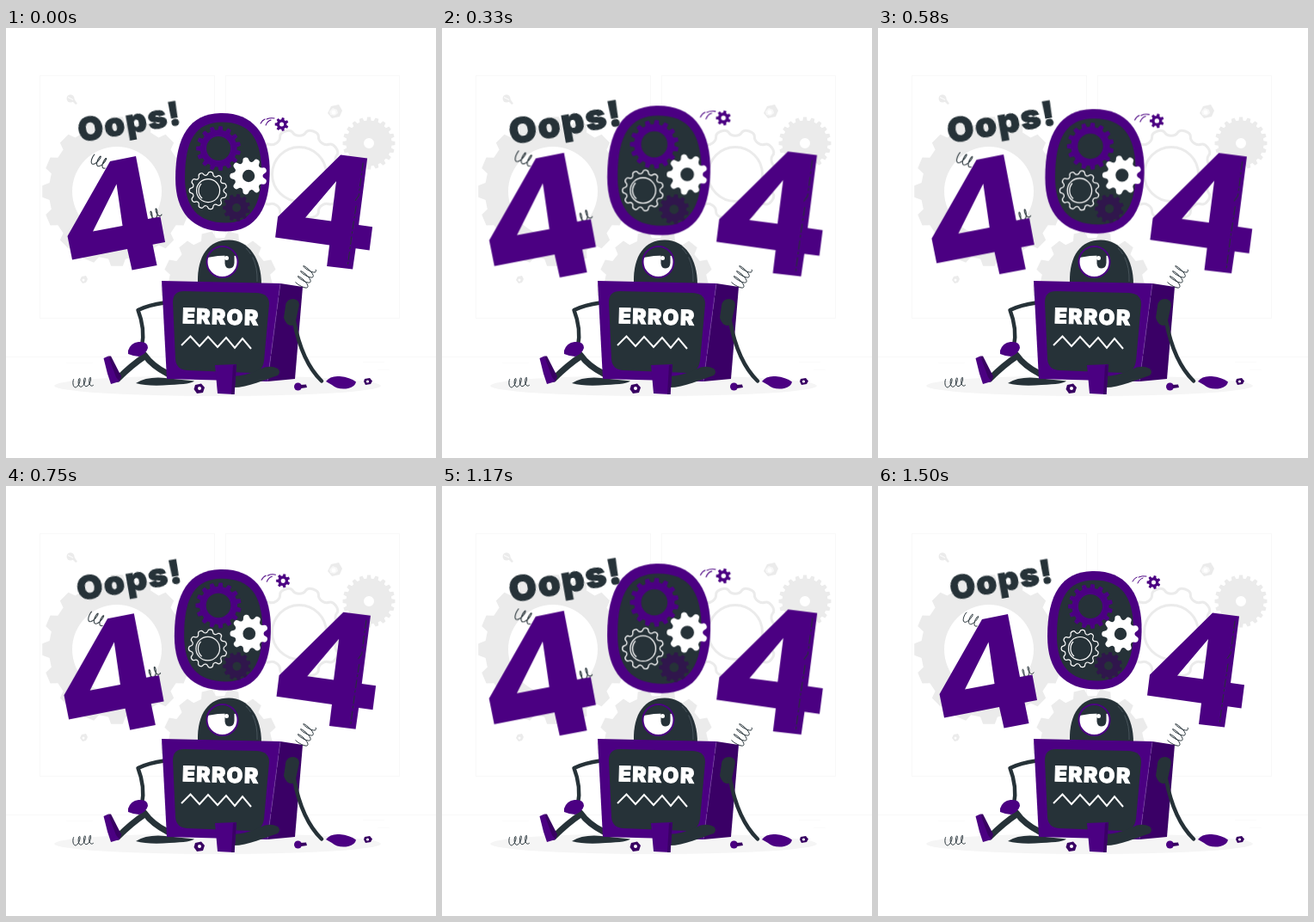
Write an HTML page that moves like this. It is 500 px wide and 500 px high and loops after 1540 ms.

```html
<!DOCTYPE html>
<html lang="en">
<head>
<meta charset="utf-8">
<title>404</title>
<style>
  html, body { margin: 0; width: 100%; height: 100%; overflow: hidden; background: #fff; }
  svg { display: block; width: 100vw; height: 100vh; }
  .p { fill: #4b0082; }
  .d { fill: #263238; }
  .g { fill: #ebebeb; }
  .w { fill: #fff; }
  .line { fill: none; stroke: #263238; stroke-linecap: round; stroke-linejoin: round; }
  .thin { stroke-width: 1; }
  .chalk { fill: none; stroke: #fff; stroke-width: 1.2; }
  .faint { fill: none; stroke: #f8f8f8; }
  .ghost { fill: none; stroke: #ebebeb; stroke-width: 3; }
  text { font-family: Inter, "Open Sans", sans-serif; font-weight: 900; text-anchor: middle; stroke-width: .9; }
  .beat { animation: beat 1540ms linear infinite; }
  #digits { transform-origin: 248.5px 190px; }
  #oops { transform-origin: 145px 108.5px; }
  @keyframes beat {
    0%, 57.6%, 96.8%, 100% { transform: scale(1); }
    19.1%, 77% { transform: scale(1.1); }
  }
</style>
</head>
<body>
<svg viewBox="0 0 500 500">
  <!-- backdrop -->
  <g class="faint">
    <rect x="39.5" y="55.5" width="203" height="282"/>
    <rect x="255.5" y="55.5" width="202" height="282"/>
    <path d="M0 382.5H500"/>
    <path d="M415 388.5H440M432 397.5H446M70 389.5H101M131 393.5H143" stroke="#fbfbfb"/>
  </g>
  <path class="g" fill-rule="evenodd" data-gear="129 190 16 87 79 52"/>
  <path class="g" data-gear="249 305 14 69 61"/>
  <path class="ghost" data-cog="341 170 10 53 45"/>
  <circle class="ghost" cx="341" cy="170" r="31.500"/>
  <path class="g" fill-rule="evenodd" data-gear="422 134 20 30.5 26.5 6"/>
  <g class="g">
    <circle cx="75" cy="82" r="4.500"/>
    <path d="M76 84L79 82L83 88L81 89Z"/>
    <path d="M378 91L387 89L391 96L388 103L379 105L374 99Z"/>
    <path d="M88 289L93 288L95 292L93 296L89 297L86 293Z"/>
  </g>
  <path d="M376 97L380 93L385 95L386 99L382 102L377 101Z" fill="#f7f7f7"/>
  <circle class="w" cx="381" cy="98" r="2.500"/>
  <circle class="w" cx="90" cy="293" r="1.500"/>
  <path d="M72 80.500L78 83.500" stroke="#fff"/>
  <ellipse cx="246" cy="416" rx="190" ry="12" fill="#f5f5f5"/>

  <!-- 404 -->
  <g id="digits" class="beat">
    <path class="line thin" data-coil="101 152 117 158 2.5 6"/>
    <path class="line thin" data-coil="164 221 179 213 2.5 5"/>
    <path class="p" fill-rule="evenodd" d="M121 155L151 149L165 222L179.500 219.500L185 249L170.500 251.800L175.500 276L146.500 281.500L141 257L77 269.500L71.500 242ZM101 236.500L135.500 230L128.500 181.500Z"/>
    <path class="p" fill-rule="evenodd" d="M389 147.500L420 151.500L410 229L426 231.300L422.500 258.500L406.500 256.300L403 280.500L373 277L376 252.500L313 243.500L316 219.500ZM348 220.500L378 224.500L384 178Z"/>
    <path class="line" stroke-dasharray="9 3 2 4" d="M415 157L410 195L405 202M407 207L402 240L397 278"/>
    <path class="p" d="M249 99C286 98 305 122 306.500 161C308 209 291 236.500 255 236.500C216 236.500 197 214 197 175C197 125 214 100 249 99Z"/>
    <path class="d" d="M251 109.500C283 109.500 296 128 297 164C298 208 283 226.500 256 226.500C222 226.500 208 208 208 174C208 130 221 109.500 251 109.500Z"/>
    <path class="p" fill-rule="evenodd" data-gear="247 140 15 26 21.5 14"/>
    <path fill="#30164c" fill-rule="evenodd" data-gear="268 209 11 16 13 5"/>
    <path class="w" fill-rule="evenodd" data-cog="282 172 9 22 16.5 7.2"/>
    <path class="chalk" data-cog="235 189 11 22 18"/>
    <circle class="chalk" cx="235" cy="189" r="13.500"/>
    <path class="chalk" d="M227 181A12 12 0 0 0 228 198" stroke-width=".8"/>
    <path class="p" fill-rule="evenodd" data-gear="320.5 112 7 8 5.8 2.5"/>
    <path class="line thin" style="stroke:#4b0082" d="M296 111Q298 107 301 106M302 113Q304 108 308 107M303 106Q307 104 312 105"/>
  </g>
  <g id="oops" class="beat">
    <text class="d" stroke="#263238" font-size="38" letter-spacing="1.4" transform="translate(146 122.500) rotate(-10)">Oops!</text>
  </g>

  <!-- head -->
  <path class="d" d="M223 297C222 264 236 246.500 259 246.500C283 246.500 297 269 297 298Z"/>
  <path d="M279 256Q293 270 292 295" fill="none" stroke="#56636a" stroke-width=".7" stroke-dasharray="9 4 30"/>
  <circle cx="251.500" cy="272" r="18" class="w"/>
  <path class="d" d="M234 267A18 18 0 0 1 268.500 265Q252 263.500 234 267Z"/>
  <path class="d" d="M254.500 264H265.500V273Q265 279.500 260 279.500Q255 279.500 254.500 274Z"/>
  <circle class="w" cx="256.500" cy="267.500" r="2.500"/>
  <circle cx="251.500" cy="272" r="18" fill="none" stroke="#4b0082" stroke-width="2"/>

  <!-- limbs behind the body -->
  <path class="line" stroke-width="4.500" d="M184 319.500Q166 322 153.500 328Q162 350 158 370"/>
  <path class="line" stroke-width="7" d="M161 380Q170 393 188 402"/>
  <path class="line" stroke-width="7" d="M130 408Q146 392 161 382"/>
  <path class="p" d="M142 375Q145 366 154 365Q165 364 165 372Q163 379 155 382Q149 382 142 379Z"/>
  <path class="p" d="M113.500 384L119 381.500L132 404L132 411L122 414L118 402Z"/>
  <path d="M119 381.500L122 381.500L134 405L132 411L128 406Z" fill="#380062"/>
  <path class="d" d="M151 413Q164 405 185 407L219 410.500Q216 414 190 415Q166 417 151 413Z"/>
  <path class="line thin" data-coil="343 299 354 278 3.5 8"/>

  <!-- body -->
  <path d="M319 297L345 301L336 408L304 411Z" fill="#3a0066"/>
  <path class="p" d="M181 294L319 297L304 411L187 408Z"/>
  <path d="M319 297L304 411" stroke="#7440a0" stroke-width=".7" stroke-dasharray="14 3"/>
  <path class="d" d="M207 306L292 308Q306 309 306 321L300 387Q298 401 285 401L210 398Q198 397 197 385L194 319Q194 306 207 306Z"/>
  <text class="w" stroke="#fff" font-size="24.500" letter-spacing="1.300" transform="translate(249.500 344.500) rotate(1.500)">ERROR</text>
  <path d="M204 369L214.500 358.500L225 370L235 359L246 371L256 360L266 372L275 361L285 373" fill="none" stroke="#fff" stroke-width="2"/>

  <!-- right arm and leg -->
  <path class="d" d="M325 323Q326 315 334 315Q341 316 341 322L336 345Q327 349 323 337Z"/>
  <path class="line" stroke-width="4.500" d="M335 341C339 362 348 392 367 410.500"/>
  <path class="p" d="M372 411Q377 404 388 405Q400 406 407 411.500Q406 417 398 419Q386 421 379 415Z"/>
  <path class="d" d="M262 418C280 419 300 409 316 404Q320 400 316 396Q306 391 295 397Q281 404 263 405Z"/>
  <path class="p" d="M243 392L268 391L265.500 426L246 425Z"/>
  <path d="M264 392L268 391L265.500 426L262 426Z" fill="#3a0066"/>

  <!-- loose parts -->
  <path fill="#380062" d="M220 415L227 413.500L231 418L229 424L222 425L218.500 420Z"/>
  <circle class="w" cx="225" cy="419" r="2"/>
  <circle class="p" cx="339.500" cy="417" r="4.500"/>
  <path d="M342 415L349 414.500L350 418L343 419Z" fill="#380062"/>
  <path fill="#380062" d="M417 408L423 407L426 410.500L424 414L418 415L416 411Z"/>
  <circle class="w" cx="420.500" cy="411" r="1.600"/>
  <path class="line thin" data-coil="79 413 101 411 3.5 5"/>
</svg>
<script>
  const pt = (x, y) => x.toFixed(2) + ' ' + y.toFixed(2);
  const hole = (cx, cy, r) =>
    r ? `M${cx - r} ${cy}a${r} ${r} 0 1 0 ${2 * r} 0a${r} ${r} 0 1 0 ${-2 * r} 0Z` : '';

  // corners of n teeth between radii r and R
  function teeth(cx, cy, n, R, r) {
    const pts = [];
    for (let i = 0; i < n; i++) {
      for (const [k, q] of [[-.32, r], [-.2, R], [.2, R], [.32, r]]) {
        const a = (i + k) * 2 * Math.PI / n + Math.PI;
        pts.push([cx + q * Math.cos(a), cy + q * Math.sin(a)]);
      }
    }
    return pts;
  }

  function gear(cx, cy, n, R, r, h) {
    return 'M' + teeth(cx, cy, n, R, r).map(p => pt(...p)).join('L') + 'Z' + hole(cx, cy, h);
  }

  // gear with rounded teeth
  function cog(cx, cy, n, R, r, h) {
    const pts = teeth(cx, cy, n, R, r);
    const mid = i => {
      const [a, b] = [pts[i], pts[(i + 1) % pts.length]];
      return pt((a[0] + b[0]) / 2, (a[1] + b[1]) / 2);
    };
    return 'M' + mid(pts.length - 1) + pts.map((p, i) => 'Q' + pt(...p) + ' ' + mid(i)).join('') + 'Z' + hole(cx, cy, h);
  }

  // looping wire from one point to another
  function coil(x0, y0, x1, y1, turns, h) {
    const len = Math.hypot(x1 - x0, y1 - y0);
    const ux = (x1 - x0) / len, uy = (y1 - y0) / len, pts = [];
    for (let i = 0; i <= turns * 20; i++) {
      const a = i / 20 * 2 * Math.PI;
      const s = len * i / (turns * 20) - 2.5 * Math.sin(a), v = -h * Math.cos(a + .5);
      pts.push(pt(x0 + ux * s - uy * v, y0 + uy * s + ux * v));
    }
    return 'M' + pts.join('L');
  }

  for (const [name, make] of Object.entries({ gear, cog, coil })) {
    document.querySelectorAll(`[data-${name}]`).forEach(el =>
      el.setAttribute('d', make(...el.dataset[name].split(' ').map(Number))));
  }
</script>
</body>
</html>
```
